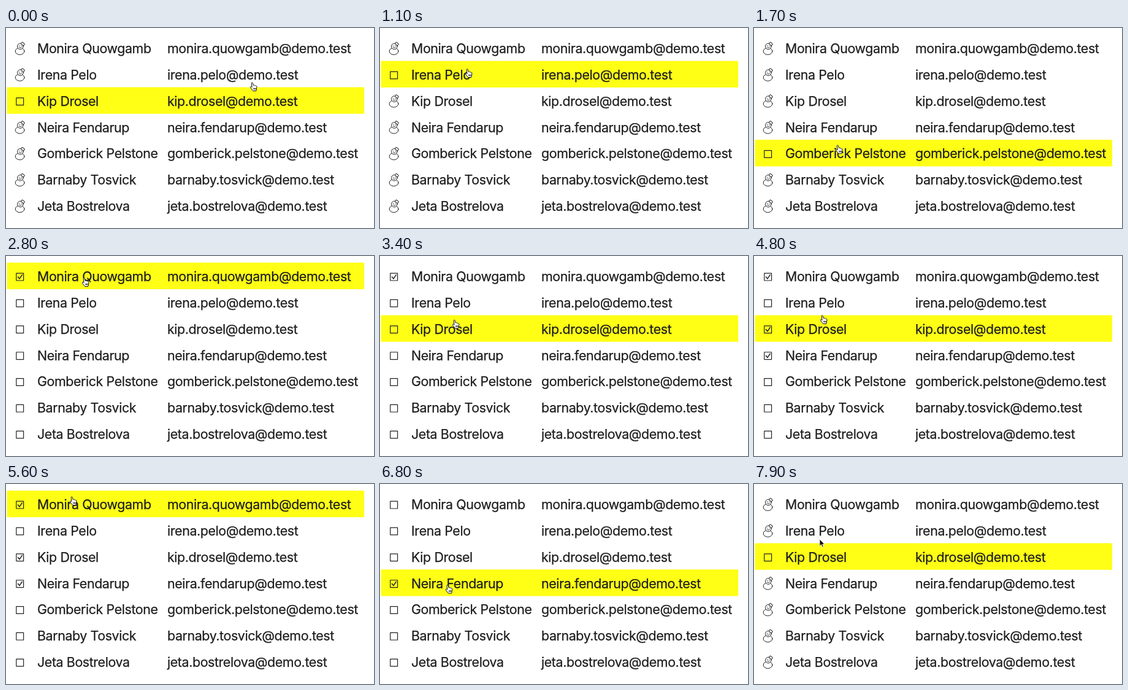
An HTML page for the animation above (8000 ms loop, 600 by 326 pixels).

```html
<!DOCTYPE html>
<html lang="en">
<head>
<meta charset="utf-8">
<title>Hover and select rows</title>
<style>
  html, body { margin: 0; width: 100%; height: 100%; overflow: hidden; background: #fff; }
  svg { display: block; width: 100%; height: 100%; }
  text { font: 400 21.4px Inter, Roboto, sans-serif; letter-spacing: -.4px; fill: #1e1e1e; stroke: #1e1e1e; stroke-width: .25; }
  .icon { fill: none; stroke: #222; stroke-linecap: round; stroke-linejoin: round; }
  .dot { fill: #222; stroke: none; }
</style>
</head>
<body>
<svg viewBox="0 0 600 326">
  <defs>
    <g id="snowman" class="icon">
      <ellipse cx="22.6" cy="37.9" rx="7.4" ry="5.6"/>
      <circle cx="23.3" cy="30" r="4.8" fill="#fff"/>
      <rect x="-2.7" y="-2" width="5.4" height="3.6" rx="1" fill="#fff" transform="translate(27.3 26) rotate(40)"/>
      <path d="M21.6 31.8Q23.5 33.2 25.3 31.4"/>
      <circle class="dot" cx="21.6" cy="29.2" r=".7"/>
      <circle class="dot" cx="25" cy="29" r=".7"/>
    </g>
    <rect id="box" class="icon" x="16.8" y="28.2" width="11.8" height="11.8" stroke-width="1.2"/>
    <path id="tick" class="icon" d="M19.5 34L22 37.1L26.3 30.7" stroke-width="1.5"/>
  </defs>
  <rect id="highlight" x="1.5" width="582.5" height="43.3" fill="#ffff16"/>
  <g id="rows"></g>
  <g id="cursor" stroke="#111" stroke-linejoin="round">
    <path id="hand" fill="#fff" d="M2.1 1.6Q3.2 -.2 4.3 1.6L5.2 5.4Q6.6 4.5 7.3 5.8Q8.6 5.1 9.3 6.4Q10.8 6.2 11 7.9L9.9 14.5H4.6L.6 9.3Q-.1 7.5 1.5 7.4L3.1 8.6ZM5.8 9.8V12.3M7.4 9.8V12.3M9 9.8V12.3"/>
    <path id="arrow" fill="#111" stroke="#fff" stroke-width=".8" d="M0 0V11.2L2.6 8.8L4.4 12.8L6.3 12L4.6 8.1H8Z"/>
  </g>
</svg>
<script>
const LOOP = 8000, STEP = 100, PITCH = 42.85;
const $ = id => document.getElementById(id);
const show = (node, on) => { node.style.display = on ? '' : 'none'; };

const people = ['Monira Quowgamb', 'Irena Pelo', 'Kip Drosel', 'Neira Fendarup',
  'Gomberick Pelstone', 'Barnaby Tosvick', 'Jeta Bostrelova'];

// Turning points of the pointer; it eases from one to the next
const turns = [
  { t: 0, x: 398, y: 88 },
  { t: 200, x: 330, y: -20 },
  { t: 400, x: 150, y: -20 },
  { t: 1100, x: 139, y: 66 },
  { t: 2010, x: 131, y: 236 },
  { t: 2800, x: 124, y: 35 },
  { t: 4000, x: 112, y: 172 },
  { t: 5600, x: 104, y: 20 },
  { t: 7000, x: 107, y: 172 },
  { t: 7500, x: 107, y: 172 },
  { t: 7900, x: 107, y: 90 }
];

// Each click toggles the row under the pointer
const clickTimes = [2750, 3500, 4300, 5700, 6400, 6900];

function pointerAt(t) {
  const to = turns.find(turn => turn.t > t) || turns[turns.length - 1];
  const from = turns[turns.indexOf(to) - 1];
  const p = Math.min(1, (t - from.t) / (to.t - from.t));
  const ease = p * p * (3 - 2 * p);
  return { x: from.x + (to.x - from.x) * ease, y: from.y + (to.y - from.y) * ease };
}

const rowAt = t => Math.floor((pointerAt(t).y - 2) / PITCH);
const clicks = clickTimes.map(t => ({ t, row: rowAt(t) }));
const isChecked = (row, t) => clicks.filter(c => c.row === row && c.t <= t).length % 2 === 1;

$('rows').innerHTML = people.map((name, i) => `
  <g transform="translate(0 ${i * PITCH})">
    <use href="#snowman"/><use href="#box"/><use href="#tick"/>
    <text x="51" y="41">${name}</text>
    <text x="263" y="41">${name.toLowerCase().replace(' ', '.')}@demo.test</text>
  </g>`).join('');
const icons = [...$('rows').children].map(row => row.querySelectorAll('use'));

function draw(t) {
  const { x, y } = pointerAt(t);
  const hovered = rowAt(t);
  const checked = people.map((_, i) => isChecked(i, t));
  const selecting = checked.includes(true);

  show($('highlight'), hovered >= 0);
  $('highlight').setAttribute('y', 10.8 + hovered * PITCH);
  icons.forEach(([snowman, box, tick], i) => {
    const boxed = selecting || i === hovered;
    show(snowman, !boxed);
    show(box, boxed);
    show(tick, checked[i]);
  });

  const leaving = t >= turns[turns.length - 1].t;
  show($('hand'), !leaving);
  show($('arrow'), leaving);
  $('cursor').setAttribute('transform', `translate(${x} ${y})`);
}

const start = performance.now();
function frame() {
  const t = (performance.now() - start) % LOOP;
  draw(Math.floor(t / STEP) * STEP);
  requestAnimationFrame(frame);
}
frame();
</script>
</body>
</html>
```
